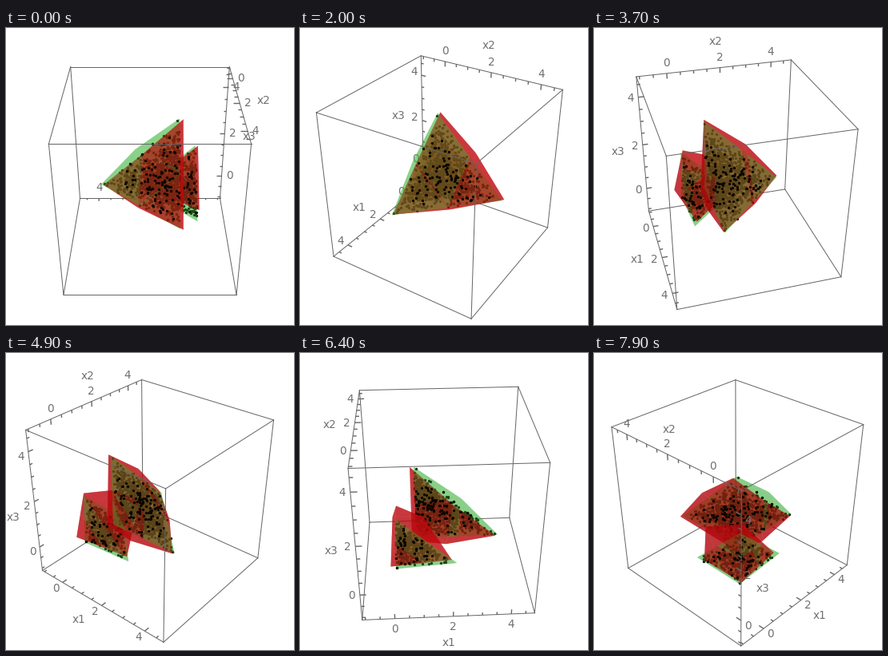
A matplotlib script for the animation above (8 s loop, 360x372 px).

```python
from itertools import combinations, product

import matplotlib.pyplot as plt
import numpy as np
from matplotlib.animation import FuncAnimation
from matplotlib.collections import LineCollection, PolyCollection

W, H, FRAMES = 360, 372, 80
DIST, FOCAL = np.hypot(3.2, 2), 781
COS, SIN = 3.2 / DIST, 2 / DIST
CENTER = np.array([179.5, 185])
LOW, SPAN = -1.11, 5.92
GRAY, TEXT = "#666666", "#707070"
RED, GREEN = np.array([198, 8, 14]) / 255, np.array([60, 190, 60]) / 255
EYE = np.eye(3)
NAME_GAP, TICK_GAP = np.array([31, 33]), np.array([10, 13])
rng = np.random.default_rng(4)


class Camera:
    """Perspective view from above, circling the vertical axis."""

    def __init__(self, n):
        a = 0.05 * n - np.pi
        self.c, self.s = np.cos(a), np.sin(a)
        self.scale, self.lift = 1, 0
        self.eye = np.array([-self.s * 3.2, -self.c * 3.2, 2])

    def view(self, p):
        x, y, z = np.moveaxis(np.asarray(p, float), -1, 0)
        right, back = x * self.c - y * self.s, x * self.s + y * self.c
        return right, z * COS + back * SIN, DIST + back * COS - z * SIN

    def depth(self, p):
        return self.view(p)[2]

    def project(self, p):
        right, up, depth = self.view(p)
        x = CENTER[0] + FOCAL * right / depth
        y = CENTER[1] - FOCAL * up / depth
        return np.stack([W - (W - x) * self.scale, y * self.scale - self.lift], -1)


def unit(v):
    return v / np.linalg.norm(v)


def tetra(corners, mids):
    """Tetrahedron with four triangles a side; edge midpoints may be moved."""
    corners = np.array(corners)
    mid = {e: np.array(mids.get(e, corners[list(e)].mean(0)))
           for e in combinations(range(4), 2)}
    tris = []
    for i, j, k in combinations(range(4), 3):
        a, b, c = mid[i, j], mid[j, k], mid[i, k]
        tris += [(corners[i], a, c), (a, corners[j], b),
                 (c, b, corners[k]), (a, b, c)]
    return np.array(tris)


class Body:
    """A green solid full of dots with a red one fitted around it."""

    def __init__(self, green, red, count):
        self.shells = [(tetra(*green), GREEN, 0.36), (tetra(*red), RED, 0.56)]
        self.dots = rng.dirichlet(np.ones(4), count) @ np.array(green[0])

    def draw(self, ax, cam, z):
        layers = {False: [], True: []}
        light = 0.5 * unit(cam.eye) + 0.5 * EYE[2]
        for tris, color, alpha in self.shells:
            middle = tris.mean((0, 1))
            for tri in tris:
                n = unit(np.cross(tri[1] - tri[0], tri[2] - tri[0]))
                n *= np.sign(n @ (tri[0] - middle))
                shade = 0.86 + 0.2 * max(0, n @ light)
                rgba = (*np.clip(color * shade, 0, 1), alpha)
                front = bool((cam.eye - tri[0]) @ n > 0)
                layers[front].append((cam.depth(tri.mean(0)), tri, rgba))
        for front, layer in layers.items():
            layer.sort(key=lambda item: -item[0])
            ax.add_collection(PolyCollection(
                [cam.project(tri) for _, tri, _ in layer],
                facecolors=[c for *_, c in layer], linewidths=0,
                zorder=z + 2 * front))
        xy = cam.project(self.dots)
        for part, dz in ((xy, 1), (xy[::9], 3)):
            ax.scatter(*part.T, s=5.6, c="#0c0600", linewidths=0, zorder=z + dz)


# Corners run: inner, top (x3), x1 tip, x2 tip.
BIG = Body(
    ([(-.17, -.17, -.17), (-.178, -.16, .308),
      (.312, -.168, -.167), (-.174, .312, -.165)],
     {(1, 2): (.09, -.165, .094)}),
    ([(-.2, -.19, -.175), (-.2, -.155, .305),
      (.297, -.17, -.172), (-.192, .318, -.165)],
     {(1, 2): (.045, -.172, .055), (1, 3): (-.195, .105, .1),
      (0, 2): (0, -.2, -.2), (2, 3): (.072, .09, -.17)}), 950)
SMALL = Body(
    ([(-.3, -.3, -.295), (-.29, -.29, .05),
      (.06, -.29, -.275), (-.295, .06, -.295)], {}),
    ([(-.327, -.34, -.245), (-.305, -.275, .055),
      (.03, -.27, -.265), (-.31, -.02, -.265)],
     {(1, 2): (-.13, -.16, -.03), (1, 3): (-.29, -.02, -.035),
      (2, 3): (-.08, -.08, -.19)}), 430)

CORNERS = [np.array(c) for c in product((-.5, .5), repeat=3)]
EDGES = [np.array([a, b]) for a, b in combinations(CORNERS, 2)
         if np.abs(a - b).sum() == 1]
# name, direction, middle of the edge, possible tick directions
AXES = [("x1", EYE[0], np.array([0, -.5, -.5]), (EYE[1], EYE[2])),
        ("x2", EYE[1], np.array([-.5, 0, .5]), (EYE[0], -EYE[2])),
        ("x3", EYE[2], np.array([-.5, -.5, 0]), (EYE[0], EYE[1]))]


def tick_side(cam, along, mid, options):
    """Pick the inward direction most square to the axis on screen."""
    a, b = cam.project([mid - along / 2, mid + along / 2])
    axis, start = unit(b - a), cam.project(mid)

    def square(d):
        v = unit(cam.project(mid + d * 0.5) - start)
        return abs(axis[0] * v[1] - axis[1] * v[0])

    best = max(options, key=square)
    return best, -unit(cam.project(mid + best * 0.1) - start)


def fit(cam):
    """Shrink or lift the picture so that the axis names stay on the stage."""
    def name_spot(axis):
        _, along, mid, options = axis
        return cam.project(mid) + tick_side(cam, along, mid, options)[1] * NAME_GAP

    left = name_spot(AXES[2])[0] - 8.5
    cam.scale = W / (W - min(left, 0))
    cam.lift = max(0, name_spot(AXES[0])[1] - 362.5)


def draw_axis(ax, cam, name, along, mid, options):
    side, out = tick_side(cam, along, mid, options)
    ticks = []

    def label(text, point, gap):
        x, y = cam.project(point) + out * gap
        z = 20 if cam.depth(point) < DIST else 1
        ax.text(x, y, text, ha="center", va="center", color=TEXT,
                family="DejaVu Sans", fontsize=9.8, zorder=z)

    for v in np.arange(-1, 4.6, 0.5):
        point = mid + along * ((v - LOW) / SPAN - 0.5)
        major = v % 2 == 0
        ticks.append(cam.project([point, point + side * (.035 if major else .02)]))
        if major:
            label(f"{v:.0f}", point, TICK_GAP)
    z = 20 if cam.depth(mid) < DIST else 1
    ax.add_collection(LineCollection(ticks, colors=GRAY, linewidths=1, zorder=z))
    label(name, mid, NAME_GAP)


def draw(n):
    ax.cla()
    ax.set(xlim=(-.5, W - .5), ylim=(H - .5, -.5))
    ax.axis("off")
    cam = Camera(n)
    fit(cam)
    for edge in EDGES:
        z = 19 if cam.depth(edge.mean(0)) < DIST else 0
        ax.plot(*cam.project(edge).T, color=GRAY, lw=0.72, zorder=z)
    for axis in AXES:
        draw_axis(ax, cam, *axis)
    order = (SMALL, BIG) if cam.eye.sum() > -0.5 else (BIG, SMALL)
    for i, body in enumerate(order):
        body.draw(ax, cam, 4 + 5 * i)


fig = plt.figure(figsize=(3.6, 3.72), dpi=100, facecolor="white")
ax = fig.add_axes([0, 0, 1, 1])
anim = FuncAnimation(fig, draw, frames=FRAMES, interval=100,
                     init_func=lambda: None, repeat=True, repeat_delay=0)
plt.show()
```
